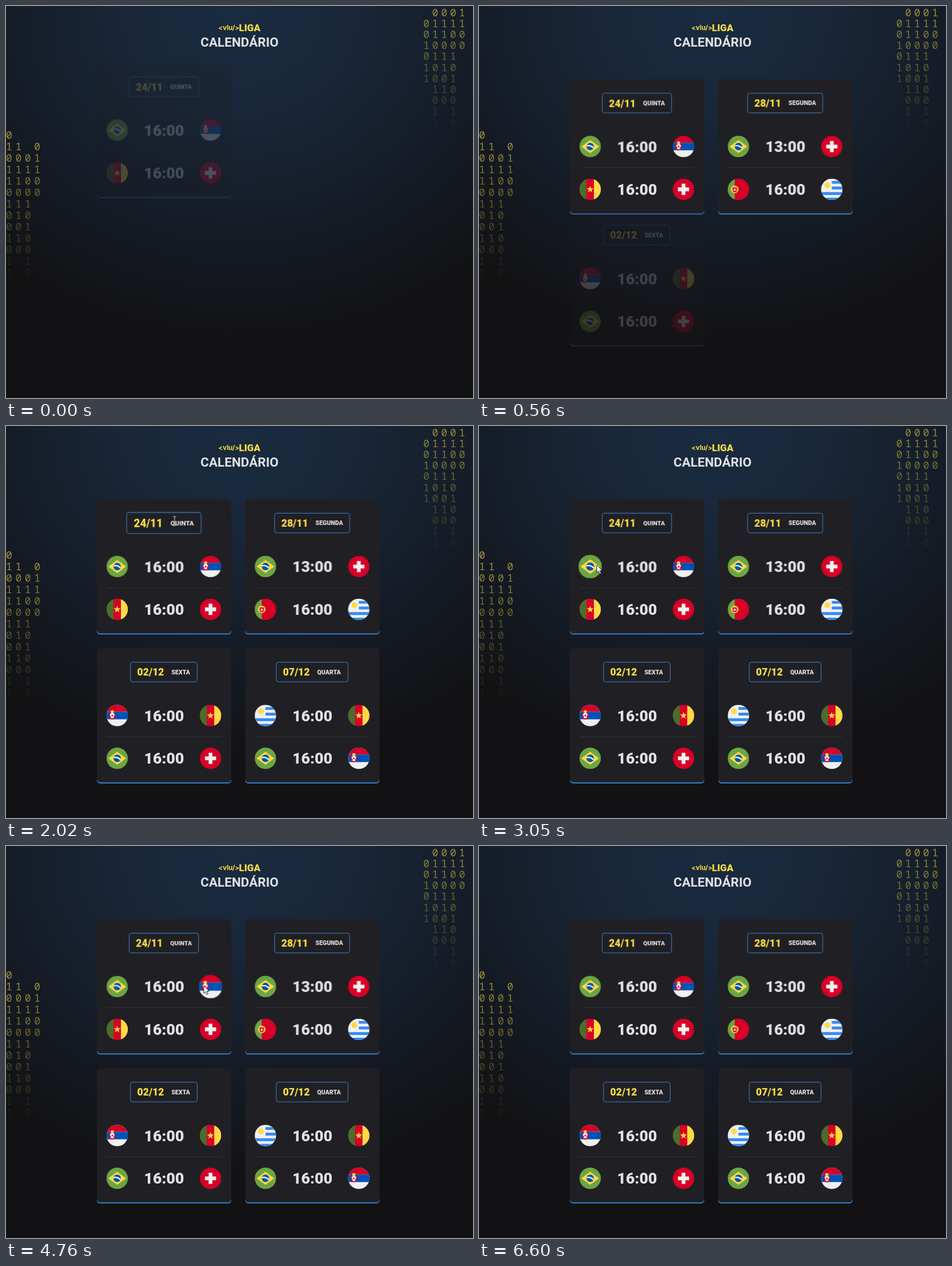
Write an HTML page that moves like this. It is 817 px wide and 685 px high and loops after 7.94 s.

```html
<!DOCTYPE html>
<html lang="pt-BR">
<head>
<meta charset="utf-8">
<title>Calendário</title>
<style>
  html, body { margin: 0; width: 100%; height: 100%; overflow: hidden; }
  body {
    background: #121214 radial-gradient(ellipse 640px 570px at 50% 2%,
      #1a2b40 0, #192739 30%, #151c27 65%, #121214 100%);
  }
  svg { display: block; position: fixed; left: 0; top: 0; }
  text { font-family: Roboto, sans-serif; fill: #e1e1e6; }
  .bit { font: 300 18px "Noto Sans Mono", monospace; fill: #f7dd43; text-anchor: middle; }
  .tag { font: 700 11.5px Inter, sans-serif; fill: #f7dd43; }
  .brand { font-size: 17px; font-weight: 900; fill: #f7dd43; }
  .title { font-size: 22.5px; font-weight: 700; text-anchor: middle; }
  .date { font-size: 17.6px; font-weight: 800; fill: #f7dd43; }
  .day { font-size: 10.6px; font-weight: 800; }
  .time { font-size: 26.7px; font-weight: 900; text-anchor: middle; }
  .badge { fill: none; stroke: #3a82d2; }
</style>
</head>
<body>
<svg id="stage" width="817" height="685" viewBox="0 0 817 685">
  <defs>
    <clipPath id="disc"><circle cx="256" cy="256" r="256"/></clipPath>
    <clipPath id="cardShape"><rect width="235.2" height="236.5" rx="6"/></clipPath>
    <g id="br">
      <path fill="#6da544" d="M0 0h512v512H0z"/>
      <path fill="#ffda44" d="M256 100 467 256 256 412 45 256z"/>
      <circle cx="256" cy="256" r="89" fill="#0052b4"/>
      <path d="M171 239Q265 214 336 290" fill="none" stroke="#f0f0f0" stroke-width="33"/>
    </g>
    <g id="rs">
      <path fill="#f0f0f0" d="M0 0h512v512H0z"/>
      <path fill="#d80027" d="M0 0h512v167H0z"/>
      <path fill="#0052b4" d="M0 167h512v178H0z"/>
      <path fill="#d80027" d="M66 195h145v90c0 50-72 70-72 70s-73-20-73-70z"/>
      <path fill="#f0f0f0" d="M105 185h68v38l24-12-8 50-22 22 18 35-30-6-16 25-16-25-30 6 18-35-22-22-8-50 24 12z"/>
      <path fill="#d80027" d="M122 240h34v28l-17 17-17-17z"/>
      <path fill="#ffda44" d="M103 130l18 16 18-24 18 24 18-16v52h-72z"/>
    </g>
    <g id="ch">
      <path fill="#d80027" d="M0 0h512v512H0z"/>
      <path fill="#f0f0f0" d="M211 122h90v89h89v90h-89v89h-90v-89h-89v-90h89z"/>
    </g>
    <g id="cm">
      <path fill="#d80027" d="M0 0h512v512H0z"/>
      <path fill="#496e2d" d="M0 0h167v512H0z"/>
      <path fill="#ffda44" d="M345 0h167v512H345zM256 167l20 62h65l-52 38 20 62-53-38-53 38 20-62-52-38h65z"/>
    </g>
    <g id="pt">
      <path fill="#d80027" d="M0 0h512v512H0z"/>
      <path fill="#6da544" d="M0 0h167v512H0z"/>
      <circle cx="167" cy="256" r="89" fill="#ffda44"/>
      <path fill="#d80027" d="M117 211h100v62a50 50 0 0 1-100 0z"/>
      <path fill="#f0f0f0" d="M145 239h44v36a22 22 0 0 1-44 0z"/>
    </g>
    <g id="uy">
      <path fill="#f0f0f0" d="M0 0h512v512H0z"/>
      <path fill="#338af3" d="M256 56h256v66H256zM256 189h256v67H256zM0 323h512v67H0zM0 456h512v56H0z"/>
      <path fill="#ffda44" d="M150 72l18 28 32-10-2 33 32 8-22 26 22 26-32 8 2 33-32-10-18 28-18-28-32 10 2-33-32-8 22-26-22-26 32-8-2-33 32 10z"/>
    </g>
  </defs>
  <text class="tag" x="371.5" y="41.5">&lt;vlu/&gt;</text>
  <text class="brand" x="407.5" y="43.5">LIGA</text>
  <text class="title" x="408.5" y="71.3">CALENDÁRIO</text>
  <g id="bits"></g>
  <g id="cards"></g>
  <g id="cursor">
    <path id="arrow" d="M0 0v13.5l3.1-2.9 2.1 4.8 2.3-1-2.1-4.7h4.3z" fill="#fff" stroke="#111" stroke-width=".9"/>
    <path id="beam" d="M-3-8q3 0 3 2 0-2 3-2M0-6V6M-3 8q3 0 3-2 0 2 3 2" fill="none" stroke="#c4c4c8" stroke-width="1.1"/>
  </g>
</svg>
<script>
const LOOP = 7940;
const FADE = 240;
const $ = id => document.getElementById(id);

// Each step is [milliseconds, properties, easing towards the next step].
function play(el, steps) {
  const frames = steps.map(([ms, props, easing = 'linear']) => ({ offset: ms / LOOP, easing, ...props }));
  el.animate(frames, { duration: LOOP, iterations: Infinity });
}

function hover(el, on, off) {
  const rest = { transform: 'scale(1)' }, grown = { transform: 'scale(1.1)' };
  play(el, [[0, rest], [on, rest, 'ease'], [on + 250, grown],
            [off, grown, 'ease'], [off + 250, rest], [LOOP, rest]]);
}

function digits(rows, x, y, dx, dy, strength) {
  return rows.map((row, r) => [...row].map((bit, c) => bit === ' ' ? '' :
    `<text class="bit" x="${x + c * dx}" y="${y + r * dy + 6.5}" opacity="${strength * (1 - r / rows.length)}">${bit}</text>`
  ).join('')).join('');
}

const spot = (x, y, inner, cls) => `<g transform="translate(${x} ${y})"><g class="${cls}">${inner}</g></g>`;

const flag = (x, y, code) => spot(x, y,
  `<g transform="scale(.0732) translate(-256 -256)"><use href="#${code}" clip-path="url(#disc)"/></g>`, 'flag');

const match = (y, [home, time, away]) =>
  flag(35.5, y, home) + spot(117.5, y, `<text class="time" y="9.6">${time}</text>`, 'clock') + flag(198.8, y, away);

function card({ date, day, width, games }, i) {
  const left = -width / 2;
  const badge = `<rect class="badge" x="${left}" y="-17.2" width="${width}" height="34.4" rx="4"/>
    <text class="date" x="${left + 11.7}" y="6.5">${date}</text>
    <text class="day" x="${left + 71.5}" y="3.7">${day}</text>`;
  return `<g transform="translate(${159 + i % 2 * 259.4} ${128 + (i >> 1) * 260.3})"><g class="card">
    <g clip-path="url(#cardShape)">
      <rect width="235.2" height="236.5" fill="#202024"/>
      <path d="M0 230.5q0 5 6 5h223.2q6 0 6-5" fill="none" stroke="#3b86dc" stroke-width="2"/>
    </g>
    ${spot(117.2, 41.6, badge, 'label')}
    <path d="M17 154.8h201" stroke="#323238"/>
    ${match(117.6, games[0])}${match(192.4, games[1])}
  </g></g>`;
}

const days = [
  { date: '24/11', day: 'QUINTA', width: 121.3, games: [['br', '16:00', 'rs'], ['cm', '16:00', 'ch']] },
  { date: '28/11', day: 'SEGUNDA', width: 131.4, games: [['br', '13:00', 'ch'], ['pt', '16:00', 'uy']] },
  { date: '02/12', day: 'SEXTA', width: 116.6, games: [['rs', '16:00', 'cm'], ['br', '16:00', 'ch']] },
  { date: '07/12', day: 'QUARTA', width: 125.6, games: [['uy', '16:00', 'cm'], ['br', '16:00', 'rs']] },
];

$('bits').innerHTML =
  digits([' 0001', '01111', '01100', '10000', '0111', '1010', '1001', ' 110', ' 000', ' 1 1', ' 1 0'],
    735.3, 11, 15.65, 19.2, .58) +
  digits(['0', '11 0', '0001', '1111', '1100', '0000', '111', '010', '001', '110', '000', '1 1', '1 0'],
    5.5, 225, 16.35, 20, .64);
$('cards').innerHTML = days.map(card).join('');

const cards = [...document.querySelectorAll('.card')];
const pose = (opacity, y) => ({ opacity, transform: `translateY(${y}px)` });

// The first card is already slightly under way when the loop begins.
play(cards[0], [[0, pose(.23, -28.8), 'ease'], [FADE - 12, pose(1, 0)], [LOOP, pose(1, 0)]]);
[270, 556, 865].forEach((start, i) => play(cards[i + 1], [
  [0, pose(0, -30)], [start, pose(0, -30)],
  [start, pose(.2, -30), 'ease'], [start + FADE, pose(1, 0)], [LOOP, pose(1, 0)],
]));

const pick = (i, sel, n = 0) => cards[i].querySelectorAll(sel)[n];
hover(pick(0, '.label'), 1910, 2720);
hover(pick(0, '.flag'), 2840, 3660);
hover(pick(0, '.clock'), 3710, 4590);
hover(pick(0, '.flag', 1), 4575, 5450);
hover(pick(1, '.clock'), 5660, 6270);

const path = [
  [0, 585, -30], [1200, 585, -30], [1670, 405, 98], [1740, 376, 114], [2000, 295, 166],
  [2630, 295, 166], [2980, 206, 243], [3590, 206, 243], [3940, 275, 246],
  [4410, 275, 246], [4740, 346, 244], [5370, 346, 244], [5860, 508, 244],
  [6190, 508, 244], [6590, 840, 250], [LOOP, 840, 250],
];
const easings = { 1200: 'ease-in', 1740: 'ease-out', 6190: 'ease-in' };
play($('cursor'), path.map(([ms, x, y]) => [
  ms, { transform: `translate(${x}px, ${y}px)` },
  easings[ms] || (ms > 2000 ? 'ease-in-out' : 'linear'),
]));

// The pointer turns into a text beam over words and times.
const swaps = [0, 1940, 2720, 3710, 4560, 5660, 6270, LOOP];
['arrow', 'beam'].forEach((id, shape) => play($(id),
  swaps.map((ms, i) => [ms, { opacity: ms === LOOP ? 1 - shape : +(i % 2 === shape) }, 'step-end'])));
</script>
</body>
</html>
```
